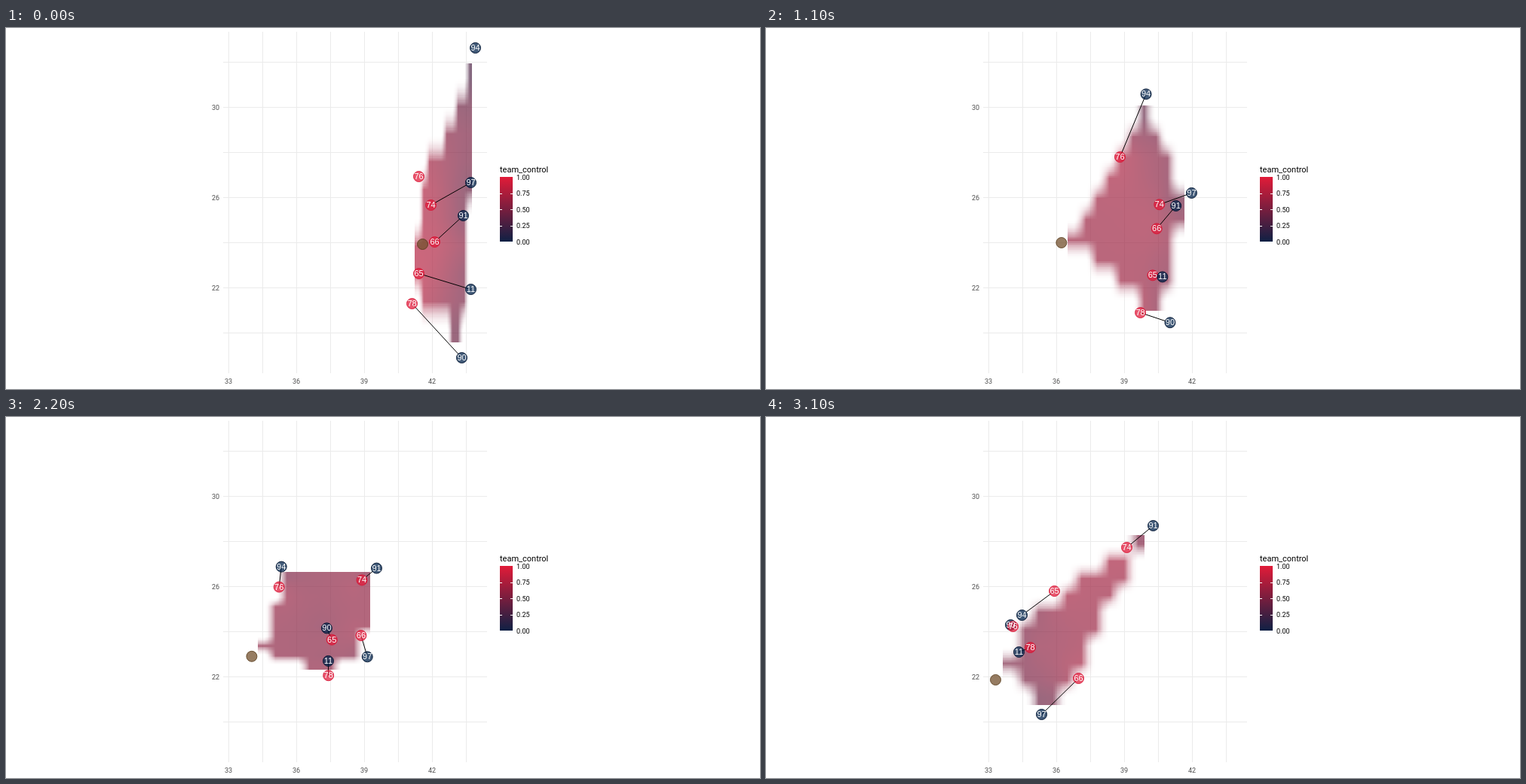
An HTML page with a canvas that plays this animation: 1000 px wide and 480 px high, repeating every 3700 ms.

```html
<!DOCTYPE html>
<html lang="en">
<head>
<meta charset="utf-8">
<title>Team control</title>
<style>
  html, body { margin: 0; width: 100%; height: 100%; overflow: hidden; background: #fff; }
  canvas { display: block; }
</style>
</head>
<body>
<canvas id="stage" width="1000" height="480"></canvas>
<script>
const ctx = document.getElementById('stage').getContext('2d');
const tile = document.createElement('canvas');
const tileCtx = tile.getContext('2d');

const STEP = 100, LAST_STEP = 31, LOOP = 3700;
const KEY_TIMES = [0, 400, 800, 1400, 1800, 2500, 3100];
const CELLS = 10, FIELD_ALPHA = 0.67, MAX_LINK = 150;
const RED = [225, 27, 56], NAVY = [15, 32, 68];
const MARKER = {
  red: { fill: 'rgba(225,27,60,.74)', edge: 'rgba(215,20,52,.85)' },
  blue: { fill: 'rgba(3,36,76,.75)', edge: 'rgba(2,20,48,.9)' },
  ball: { fill: 'rgba(115,80,45,.75)', edge: 'rgba(85,58,25,.8)' }
};

const track = (label, kind, xs, ys) => ({ label, kind, xs, ys });
const tracks = [
  track('74', 'red', [563, 557, 537, 505, 483, 469, 478], [235, 235, 234, 234, 231, 202, 173]),
  track('66', 'red', [568, 557, 535, 501, 482, 459, 414], [284, 278, 270, 266, 273, 307, 347]),
  track('65', 'red', [547, 543, 529, 491, 456, 416, 382], [326, 324, 325, 329, 318, 275, 231]),
  track('91', 'blue', [606, 588, 562, 525, 502, 491, 513], [249, 246, 240, 231, 221, 182, 144]),
  track('97', 'blue', [616, 609, 582, 545, 514, 447, 365], [205, 202, 208, 237, 275, 349, 395]),
  track('94', 'blue', [622, 599, 546, 460, 402, 348, 339], [26, 37, 63, 117, 166, 219, 263]),
  track('11', 'blue', [616, 599, 557, 495, 459, 401, 335], [347, 339, 330, 334, 339, 312, 312]),
  track('90', 'blue', [604, 583, 555, 512, 467, 393, 324], [438, 432, 414, 361, 310, 270, 276]),
  track('76', 'red', [547, 527, 495, 440, 395, 344, 327], [197, 189, 177, 173, 196, 247, 278]),
  track('78', 'red', [538, 528, 508, 483, 458, 402, 350], [366, 374, 379, 373, 360, 330, 306]),
  track('', 'ball', [552, 499, 424, 371, 351, 310, 304], [287, 286, 284, 288, 295, 335, 349])
];

// Slope at a key: neighbouring slopes weighted by the opposite interval.
function tangent(v, i) {
  const slope = k => (v[k + 1] - v[k]) / (KEY_TIMES[k + 1] - KEY_TIMES[k]);
  if (i === 0) return slope(0);
  if (i === v.length - 1) return slope(i - 1);
  const before = KEY_TIMES[i] - KEY_TIMES[i - 1], after = KEY_TIMES[i + 1] - KEY_TIMES[i];
  return (slope(i - 1) * after + slope(i) * before) / (before + after);
}

function valueAt(v, time) {
  let i = 0;
  while (i < v.length - 2 && time >= KEY_TIMES[i + 1]) i++;
  const span = KEY_TIMES[i + 1] - KEY_TIMES[i];
  const s = (time - KEY_TIMES[i]) / span, r = 1 - s;
  return r * r * (1 + 2 * s) * v[i] + s * s * (3 - 2 * s) * v[i + 1]
    + span * s * r * (r * tangent(v, i) - s * tangent(v, i + 1));
}

const dist = (a, b) => Math.hypot(a.x - b.x, a.y - b.y);
const cross = (a, b, p) => (b.x - a.x) * (p.y - a.y) - (b.y - a.y) * (p.x - a.x);

function convexHull(points) {
  const sorted = [...points].sort((a, b) => a.x - b.x || a.y - b.y);
  const chain = list => {
    const out = [];
    for (const p of list) {
      while (out.length > 1 && cross(out[out.length - 2], out[out.length - 1], p) <= 0) out.pop();
      out.push(p);
    }
    return out.slice(0, -1);
  };
  return [...chain(sorted), ...chain(sorted.reverse())];
}

// Pairing of both teams with the least total distance.
function bestPairs(reds, blues) {
  if (!reds.length) return { cost: 0, pairs: [] };
  const [first, ...rest] = reds;
  let best = { cost: Infinity };
  for (const blue of blues) {
    const sub = bestPairs(rest, blues.filter(b => b !== blue));
    const cost = sub.cost + dist(first, blue);
    if (cost < best.cost) best = { cost, pairs: [[first, blue], ...sub.pairs] };
  }
  return best;
}

function controlAt(p, reds, blues) {
  const pull = team => team.reduce((sum, q) => sum + (dist(p, q) + 60) ** -2, 0);
  const red = 1.25 * pull(reds);
  return red / (red + pull(blues));
}

function drawField(points, reds, blues) {
  const hull = convexHull(points);
  const inside = p => hull.every((a, i) => cross(a, hull[(i + 1) % hull.length], p) >= 0);
  const xs = points.map(p => p.x), ys = points.map(p => p.y);
  const x0 = Math.min(...xs), y0 = Math.min(...ys);
  const w = Math.max(...xs) - x0, h = Math.max(...ys) - y0;

  const cells = [];
  for (let r = 0; r < CELLS; r++) {
    for (let c = 0; c < CELLS; c++) {
      const p = { x: x0 + w * (c + 0.5) / CELLS, y: y0 + h * (r + 0.5) / CELLS };
      if (!inside(p)) { cells.push([255, 255, 255, 0]); continue; }
      const v = controlAt(p, reds, blues);
      cells.push([...NAVY.map((n, k) => n + (RED[k] - n) * v), 255 * FIELD_ALPHA]);
    }
  }

  // The field spans the outermost cell centres; colours blend in sixteenths.
  const left = Math.round(x0 + w * 0.05), top = Math.round(y0 + h * 0.05);
  const width = Math.round(w * 0.9), height = Math.round(h * 0.9);
  const sample = (i, size) => {
    const s = Math.floor(Math.max(0, 16 * CELLS * i / size - 8));
    const lo = s >> 4;
    return { lo, hi: Math.min(lo + 1, CELLS - 1), f: (s & 15) / 16 };
  };
  const image = tileCtx.createImageData(width, height);
  for (let j = 0, o = 0; j < height; j++) {
    const v = sample(j, height);
    for (let i = 0; i < width; i++) {
      const u = sample(i, width);
      const a = cells[v.lo * CELLS + u.lo], b = cells[v.lo * CELLS + u.hi];
      const c = cells[v.hi * CELLS + u.lo], d = cells[v.hi * CELLS + u.hi];
      for (let k = 0; k < 4; k++) {
        image.data[o++] = (a[k] * (1 - u.f) + b[k] * u.f) * (1 - v.f)
          + (c[k] * (1 - u.f) + d[k] * u.f) * v.f;
      }
    }
  }
  tile.width = width;
  tile.height = height;
  tileCtx.putImageData(image, 0, 0);
  ctx.drawImage(tile, left, top);
}

function text(str, x, y, font, color, align) {
  ctx.font = font;
  ctx.fillStyle = color;
  ctx.textAlign = align;
  ctx.fillText(str, x, y);
}

function drawAxes() {
  const font = '9px Roboto, sans-serif';
  ctx.fillStyle = '#ebebeb';
  for (let x = 295; x <= 610; x += 45) ctx.fillRect(x, 5, 1, 454);
  for (let y = 45; y <= 405; y += 60) ctx.fillRect(288, y, 350, 1);
  for (let i = 0; i < 4; i++) text(33 + 3 * i, 295 + 90 * i, 473, font, '#4d4d4d', 'center');
  for (let i = 0; i < 3; i++) text(30 - 4 * i, 283, 109 + 120 * i, font, '#4d4d4d', 'right');
}

function drawLegend() {
  text('team_control', 655, 192, '11px Roboto, sans-serif', '#000', 'left');
  const fill = ctx.createLinearGradient(0, 198, 0, 284);
  fill.addColorStop(0, `rgb(${RED})`);
  fill.addColorStop(1, `rgb(${NAVY})`);
  ctx.fillStyle = fill;
  ctx.fillRect(655, 198, 17, 86);
  for (let i = 0; i < 5; i++) {
    const y = 198 + 21.5 * i;
    ctx.fillStyle = '#fff';
    if (i > 0 && i < 4) {
      ctx.fillRect(655, Math.round(y), 3, 1);
      ctx.fillRect(669, Math.round(y), 3, 1);
    }
    text((1 - i / 4).toFixed(2), 677, Math.round(y + 3.5), '9px Roboto, sans-serif', '#000', 'left');
  }
}

function drawMarker(p) {
  const style = MARKER[p.kind];
  ctx.beginPath();
  ctx.arc(p.x + 0.5, p.y + 0.5, 7, 0, 2 * Math.PI);
  ctx.fillStyle = style.fill;
  ctx.fill();
  ctx.strokeStyle = style.edge;
  ctx.stroke();
}

function draw(time) {
  const points = tracks.map(t => ({
    label: t.label, kind: t.kind, x: valueAt(t.xs, time), y: valueAt(t.ys, time)
  }));
  const reds = points.filter(p => p.kind === 'red');
  const blues = points.filter(p => p.kind === 'blue');

  ctx.fillStyle = '#fff';
  ctx.fillRect(0, 0, 1000, 480);
  ctx.lineWidth = 1;
  drawAxes();
  drawLegend();
  drawField(points, reds, blues);

  ctx.strokeStyle = '#000';
  for (const [a, b] of bestPairs(reds, blues).pairs) {
    if (dist(a, b) > MAX_LINK) continue;
    ctx.beginPath();
    ctx.moveTo(a.x + 0.5, a.y + 0.5);
    ctx.lineTo(b.x + 0.5, b.y + 0.5);
    ctx.stroke();
  }
  points.forEach(drawMarker);
  for (const p of points) {
    text(p.label, p.x + 0.5, p.y + 4, '11px "Liberation Sans", Arial, sans-serif', '#fff', 'center');
  }
}

let shown = -1;
function tick() {
  const step = Math.min(LAST_STEP, Math.floor(performance.now() % LOOP / STEP));
  if (step !== shown) draw(step * STEP);
  shown = step;
  requestAnimationFrame(tick);
}
tick();
</script>
</body>
</html>
```
